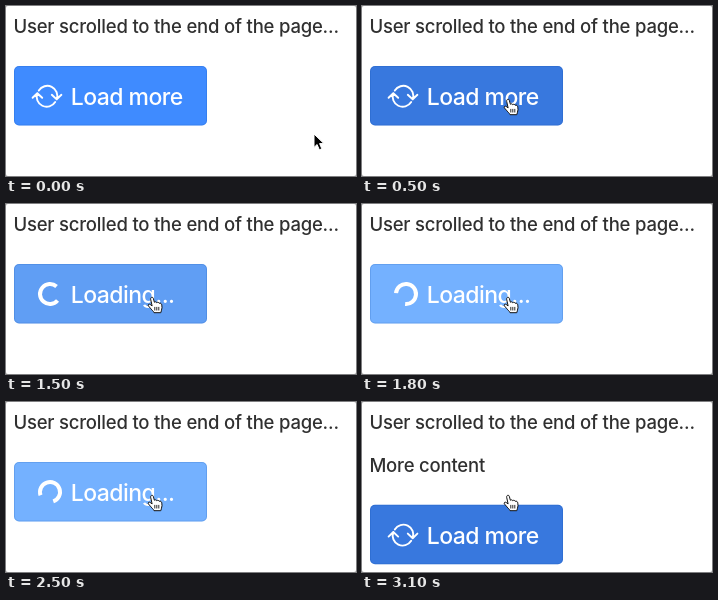
Write an HTML page that moves like this. It is 350 by 170 pixels and loops after 3200 ms.

```html
<!DOCTYPE html>
<html lang="en">
<head>
<meta charset="utf-8">
<title>Load more button</title>
<style>
  html, body { margin: 0; width: 100%; height: 100%; overflow: hidden; background: #aaa; }
  svg { display: block; width: 350px; height: 170px; }
  text { font-family: Inter, "Open Sans", sans-serif; }
  .copy { font-size: 18.5px; font-weight: 450; letter-spacing: -.2px; fill: #303030; }
  .label { font-size: 23px; font-weight: 500; letter-spacing: -.55px; fill: #fff; }
  .line { fill: none; stroke: #fff; }
</style>
</head>
<body>
<svg viewBox="0 0 350 170">
  <rect width="350" height="170" rx="2" fill="#fff"/>
  <text class="copy" x="7.4" y="27">User scrolled to the end of the page...</text>
  <text class="copy" id="more" x="7.4" y="70">More content</text>
  <g id="button">
    <rect id="face" x="8" y="60" width="193" height="59.5" rx="5"/>
    <rect x="8.5" y="60.5" width="192" height="58.5" rx="4.5" fill="none" stroke="#003c96" stroke-opacity=".15"/>
    <g id="sync" class="line" stroke-width="1.9" stroke-linecap="round" stroke-linejoin="round">
      <path d="M32.8 84.6A10 10 0 0 1 50.7 93.3M45.8 88.8L50.7 93.4L55.4 88.8"/>
      <path d="M49.2 96A10 10 0 0 1 31.3 87.3M26.6 91.8L31.3 87.2L36.2 91.8"/>
    </g>
    <path id="spinner" class="line" stroke-width="4" d="M51.07 97.07A10 10 0 1 1 51.07 82.93"/>
    <text id="label" class="label" x="64.8" y="98.8"></text>
  </g>
  <path id="arrow" d="M0 0V13.4L3.1 10.5L5.3 15.8L7.8 14.8L5.6 9.6H9.9Z" fill="#000" stroke="#fff" stroke-width="1"/>
  <g id="hand" stroke="#111" stroke-width="1" stroke-linejoin="round" stroke-linecap="round">
    <path fill="#fff" d="M-.8 2.2C-1 .4 1.4 -.1 1.9 1.6L3 5.6C3.4 4.9 5 4.9 5.3 6C6 5.3 7.5 5.5 7.8 6.6C9.2 6 10.3 7 10.4 8.4L10.6 11C10.6 13 9.6 14 9.4 16H2.6C2.2 14.6 .6 13.6 -.4 12.2L-3 9.2C-3.8 8 -2.4 6.9 -1.2 7.8L.4 9Z"/>
    <path fill="none" stroke-width=".9" d="M3.4 10.6V13.4M5.4 10.6V13.4M7.4 10.6V13.4"/>
  </g>
</svg>
<script>
const LOOP = 3200, STEP = 100, TURN = 750;
const IDLE = [63, 139, 255], HOVER = [56, 120, 222], BUSY = [116, 177, 255];
const TRAIL = [[308, 128], [296, 122], [240, 104], [178, 93], [154, 92], [145.4, 92.7]];
const el = id => document.getElementById(id);
const show = (id, on) => el(id).setAttribute("display", on ? "inline" : "none");
const progress = (t, from, to) => Math.min(1, Math.max(0, (t - from) / (to - from)));
const mix = (a, b, k) => `rgb(${a.map((v, i) => Math.round(v + (b[i] - v) * k))})`;

function faceColor(t) {
  if (t < 1300) return mix(IDLE, HOVER, progress(t, 200, 500));
  return mix(HOVER, BUSY, t < 2600 ? progress(t, 1300, 1600) : 0);
}

function draw(t) {
  const busy = t >= 1400 && t < 2600;
  const done = t >= 2600;
  const [x, y] = TRAIL[Math.min(TRAIL.length - 1, t / STEP)];
  const over = x < 201;

  show("more", done);
  show("sync", !busy);
  show("spinner", busy);
  show("arrow", !over);
  show("hand", over);
  el("face").setAttribute("fill", faceColor(t));
  el("button").setAttribute("transform", `translate(0 ${done ? 42.8 : 0})`);
  el("label").textContent = busy ? "Loading..." : "Load more";
  el("spinner").setAttribute("transform", `rotate(${(t - 1800) / TURN * 360 + 140} 44 90)`);
  for (const id of ["arrow", "hand"]) el(id).setAttribute("transform", `translate(${x} ${y})`);
}

const start = performance.now();
function tick() {
  const t = (performance.now() - start) % LOOP;
  draw(Math.floor(t / STEP) * STEP);
  requestAnimationFrame(tick);
}
tick();
</script>
</body>
</html>
```
